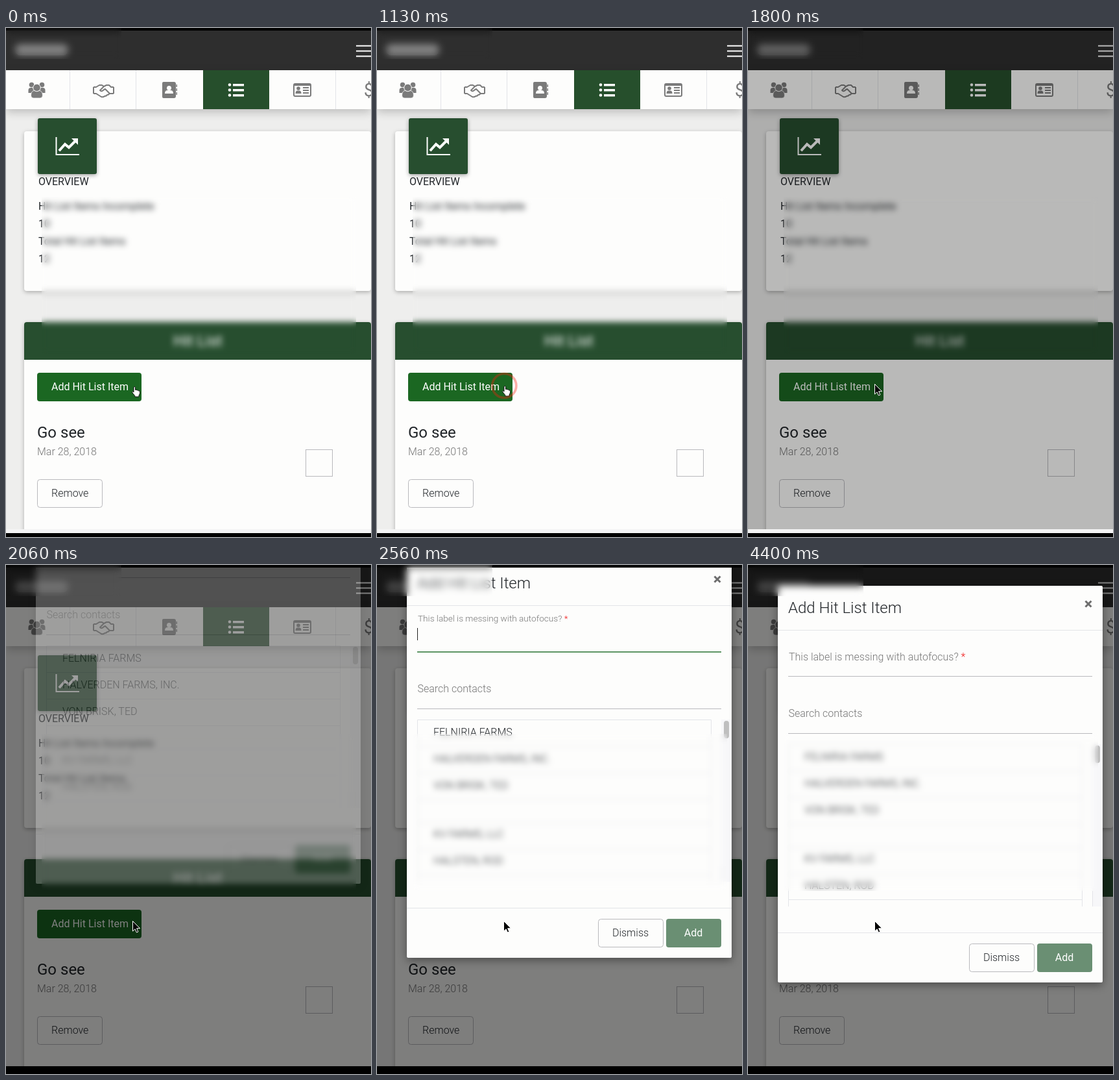
Animation, 563 px wide and 784 px high, one loop 5400 ms. Source, as an HTML page:

```html
<!DOCTYPE html>
<html lang="en">
<head>
<meta charset="utf-8">
<title>Add Hit List Item</title>
<style>
html, body { margin: 0; width: 100%; height: 100%; overflow: hidden; background: #000; }
svg { position: absolute; left: 0; top: 0; display: block; }
text { font: 300 16px Roboto, sans-serif; fill: #212529; }
.reg { font-weight: 400; }
.big { font-size: 24px; }
.mid { text-anchor: middle; }
.white { fill: #fff; }
.gray { fill: #757575; }
.card { fill: #fdfdfc; filter: drop-shadow(0 2px 3px rgba(0,0,0,.28)); }
.green { fill: #274e2f; }
.line { fill: none; stroke: #b9b9bd; }
.pale { fill: none; stroke: #e3e4e8; }
.icon { fill: #7b7b7b; stroke: none; }
.draw { fill: none; stroke: #7b7b7b; stroke-width: 2; stroke-linejoin: round; }
.blur { position: absolute; }
#logoBlur { left: 0; top: 0; width: 178px; height: 48px; backdrop-filter: blur(6px); }
#listBlur { left: 55px; top: 260px; width: 485px; height: 242px; backdrop-filter: blur(5px); }
#panel { filter: drop-shadow(0 4px 7px rgba(0,0,0,.4)); }
</style>
</head>
<body>
<svg width="563" height="784">
  <rect width="563" height="784" fill="#eeeeed"/>

  <!-- overview card -->
  <rect class="card" x="28" y="159" width="535" height="246" rx="4"/>
  <rect class="green" x="49" y="139" width="91" height="86" rx="3" style="filter:drop-shadow(0 2px 3px rgba(0,0,0,.35))"/>
  <path d="M77.5 168v27H113M82 189l9-10 6 5 10-10" fill="none" stroke="#fff" stroke-width="2"/>
  <path d="M82 189l9-10 6 5 10-10" fill="none" stroke="#fff" stroke-width="4"/>
  <path class="white" d="M101 170h10v10z"/>
  <text class="reg" x="50" y="242">OVERVIEW</text>
  <text class="reg" x="50" y="280">Hit List Items Incomplete</text>
  <text class="reg" x="50" y="307">10</text>
  <text class="reg" x="50" y="334">Total Hit List Items</text>
  <text class="reg" x="50" y="361">12</text>

  <!-- list card -->
  <rect class="card" x="28" y="453" width="535" height="330" rx="4"/>
  <path class="green" d="M28 511v-54q0-4 4-4h527q4 0 4 4v54z"/>
  <text class="reg big mid white" x="296" y="490">Hit List</text>
  <rect x="48" y="531" width="161" height="44" rx="4" fill="#1b6722"/>
  <text class="reg white" x="70" y="558">Add Hit List Item</text>
  <text class="reg big" x="48" y="631">Go see</text>
  <text class="gray" x="48" y="658">Mar 28, 2018</text>
  <rect class="line" x="48.5" y="695.5" width="100" height="43" rx="4"/>
  <text x="70" y="722">Remove</text>
  <rect class="line" x="462.5" y="649.5" width="41" height="41"/>

  <!-- top bar and tabs -->
  <rect y="4" width="563" height="61" fill="#2e2e2e"/>
  <rect x="14" y="25" width="82" height="17" rx="8" fill="#858585"/>
  <path d="M540 27.5h23M540 35.5h23M540 43.5h23" stroke="#fff" stroke-width="2"/>
  <rect y="65" width="563" height="60" fill="#fdfdfc" style="filter:drop-shadow(0 5px 7px rgba(0,0,0,.2))"/>
  <path class="pale" d="M98.5 65v60M200.5 65v60M508.5 65v60"/>
  <rect x="304" y="65" width="102" height="60" fill="#264f2c"/>
  <g class="icon">
    <g id="side"><circle cx="39.5" cy="87.5" r="3.8"/><path d="M34.5 100v-4q0-4 4-4h5v8z"/></g>
    <use href="#side" transform="translate(95 0) scale(-1 1)"/>
    <circle cx="47.5" cy="92" r="5.8" stroke="#fdfdfc"/>
    <path d="M38.5 104q0-7 5-7.500q4 2.500 8 0q5 .5 5 7.500q0 4-4 4h-10q-4 0-4-4z" stroke="#fdfdfc" stroke-width=".8"/>
    <path d="M243 83h16q3 0 3 3v19q0 3-3 3h-16q-2 0-2-2v-21q0-2 2-2zM262.500 87h1.500v4h-1.500zM262.500 93h1.500v4h-1.500zM262.500 99h1.500v4h-1.500z"/>
    <g fill="#fdfdfc"><circle cx="251.500" cy="92.500" r="3.500"/><path d="M245 101q0-5 4-5h5q4 0 4 5z"/></g>
    <circle cx="451" cy="93" r="2.800"/><path d="M446.500 101q0-4.500 3-4.500h3q3 0 3 4.500z"/>
    <path d="M458 91h9v2h-9zM458 95h9v2h-9zM458 99h9v2h-9z"/>
    <text class="reg icon" x="552" y="105" style="font-size:27px;fill:#7b7b7b">$</text>
  </g>
  <g class="draw">
    <path d="M135 91h4l5-3h4l3 2 4-2h4l3 3h4M135 101h4l8 5q3 1 5-1 3 0 4-2 3 0 3-2h7M151 90l-6 6q2 3 6-1l2-1 7 7M135 91v10M166 91v10"/>
    <rect x="444" y="86" width="26" height="19" rx="2"/><path d="M444 88h26"/>
  </g>
  <path class="white" d="M350 86h17v3.500h-17zM350 94h17v3.500h-17zM350 102h17v3.500h-17z"/>
  <g class="white"><circle cx="345" cy="87.500" r="2.300"/><circle cx="345" cy="95.500" r="2.300"/><circle cx="345" cy="103.500" r="2.300"/></g>

  <rect id="shade" width="563" height="784"/>

  <!-- dialog -->
  <g id="modal">
    <rect id="panel" x="46" y="32" width="501" height="611" rx="2" fill="#fdfdfc"/>
    <text class="big" x="62" y="74">Add Hit List Item</text>
    <path d="M520.500 55.500l9 9m0-9l-9 9" stroke="#6d6d6d" stroke-width="3"/>
    <path class="pale" d="M46 100.500h501M46 566.500h501"/>
    <text id="label" class="gray" x="63">This label is messing with autofocus? <tspan fill="#f01818">*</tspan></text>
    <path class="line" d="M62 171.500h469M62 259.500h469"/>
    <path id="focus" d="M62 172h469" stroke="#1b7025" stroke-width="2"/>
    <path id="caret" d="M62.500 135v19" stroke="#222"/>
    <text class="gray" x="62.500" y="234">Search contacts</text>
    <rect x="531" y="276" width="16" height="250" fill="#f7f7f9"/>
    <rect x="535" y="278" width="8" height="27" rx="4" fill="#bfbfbf"/>
    <path class="pale" d="M62.500 526V276.500H515.500V526M62 317.500h454M62 358.500h454M62 399.500h454M62 435.500h454M62 476.500h454M62 515.500h454M531.500 502v24"/>
    <text x="87" y="301">FELNIRIA FARMS</text>
    <text x="87" y="342">HALVERDEN FARMS, INC.</text>
    <text x="87" y="383">VON BRISK, TED</text>
    <text x="87" y="458">KV FARMS, LLC</text>
    <text x="87" y="499">HALSTEN, ROD</text>
    <rect class="line" x="341.500" y="583.500" width="100" height="43" rx="4"/>
    <text class="mid" x="391" y="610">Dismiss</text>
    <rect x="446" y="583" width="85" height="44" rx="4" fill="#6a8f73"/>
    <text class="reg mid white" x="488" y="610">Add</text>
  </g>

  <path d="M0 0h563v4H0zM0 777h563v7H0z"/>
  <rect id="foot" y="772" width="563" height="6"/>
</svg>

<div class="blur" id="logoBlur"></div>
<div class="blur" id="listBlur"></div>

<svg width="563" height="784">
  <path id="hand" d="M3 9V1.800Q3 .5 4.200 .5T5.500 1.800V5.500Q7.500 4.500 8 6 9.800 5.300 10.200 6.800 12.500 6.300 12.500 8.500V11L11 14V16H4.800V14.500L1 10Q0 8 1.500 7.800z" fill="#fff" stroke="#111"/>
  <path id="arrow" d="M0 0v15.500l3.600-3.300 2.300 5.300 2.500-1.100-2.300-5.200h5z" transform="translate(195.500 548.500)" stroke="#fff"/>
  <circle id="ring" cx="196.300" cy="551" fill="none" stroke="#f8200f" stroke-width="3.600"/>
</svg>

<script>
const $ = id => document.getElementById(id);
const set = (id, attrs) => { for (const k in attrs) $(id).setAttribute(k, attrs[k]); };
const clamp = x => Math.max(0, Math.min(1, x));

// dialog states, one per 167 ms step
const slide = [-152, -150, -67, -38, -26, -20, -11, 0];
const labelY = [141, 138, 129, 120, 117, 115, 114, 113, 113, 119, 125, 132, 137, 139.5, 141];
const focus = [0, .1, .35, .65, .8, .9, 1, 1, 1, .8, .55, .3, 0];
const at = (list, i) => list[Math.max(0, Math.min(i, list.length - 1))];

function draw(t) {
  // click ring and pointer
  const u = (t - 130) / 1100;
  const p = clamp((t - 130) / 530);
  set('ring', { r: Math.max(0, 49.5 - 34 * u), opacity: u >= 0 && u < 1 ? clamp((1 - u) * 4) : 0 });
  set('hand', { transform: `translate(${194 - p} ${552 - p})`, opacity: +(t < 1260) });
  set('arrow', { opacity: +(t >= 1260) });

  // backdrop
  const q = 1260 + Math.floor((t - 1259) / 66.7) * 66.7;
  set('shade', { opacity: clamp((q - 1475) / 585) / 2 });
  set('foot', { fill: t < 1860 ? '#f4f4f4' : '#000' });

  // dialog
  const i = Math.floor((t - 2055) / 167);
  const y = at(labelY, i);
  const size = 12.8 + 3.2 * (y - 113) / 28;
  set('modal', {
    transform: `translate(0 ${at(slide, i)})`,
    opacity: i < 0 ? 0 : clamp(.25 + i * .29)
  });
  set('label', { y: y + size * .35, style: `font-size:${size}px` });
  set('focus', { opacity: at(focus, i) });
  set('caret', { opacity: +(i >= 2 && i <= 7) });
}

function tick(now) {
  draw(now % 5400);
  requestAnimationFrame(tick);
}
draw(0);
requestAnimationFrame(tick);
</script>
</body>
</html>
```
